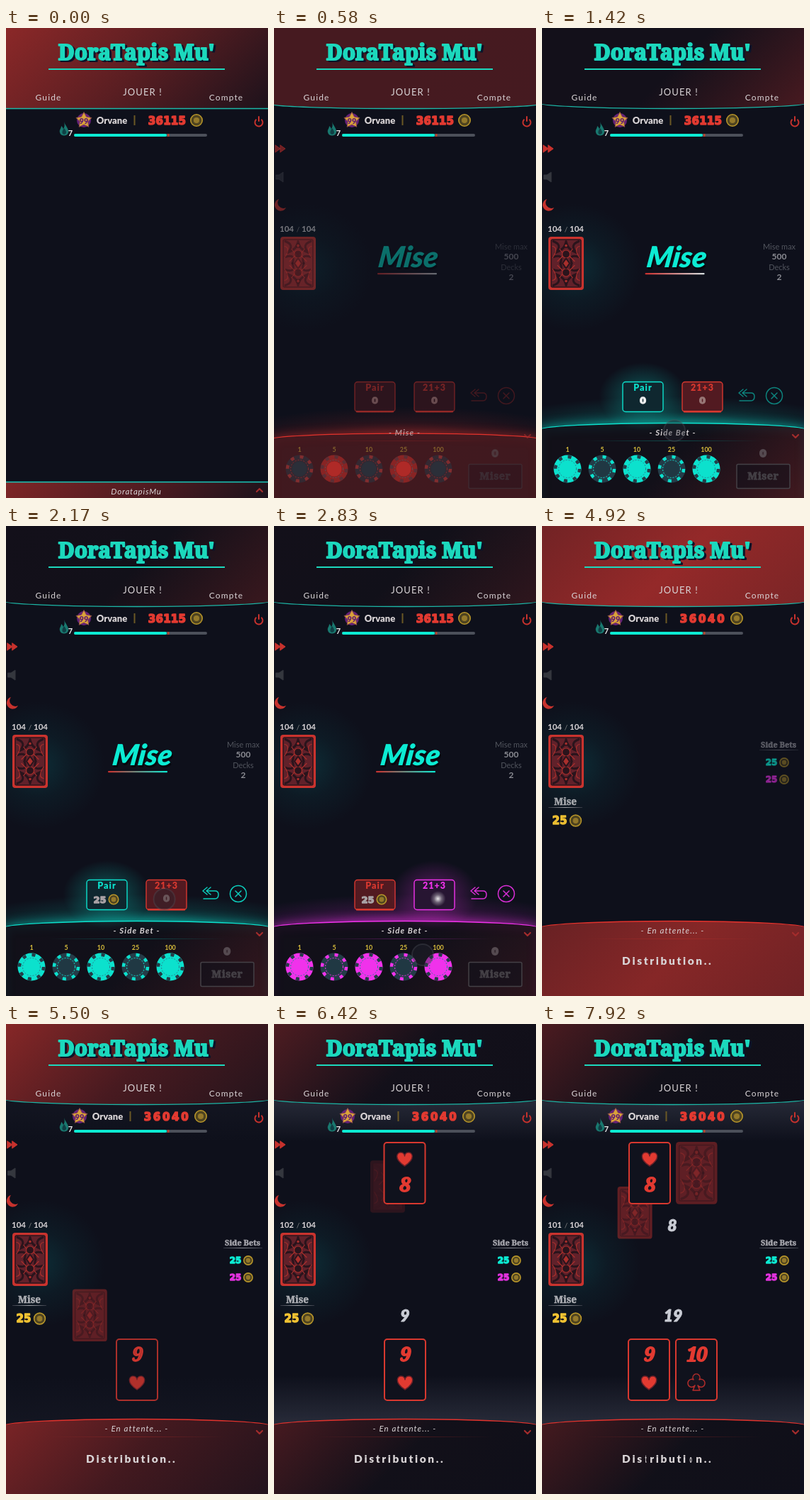
Recreate the animation shown at these times as an HTML page with a canvas. Size 370 by 662 pixels, loop 8 s.

```html
<!DOCTYPE html>
<html lang="fr">
<head>
<meta charset="utf-8">
<title>DoraTapis Mu'</title>
<style>
  html, body { margin: 0; width: 100%; height: 100%; overflow: hidden; background: #0e101b; }
  canvas { display: block; }
</style>
</head>
<body>
<canvas id="stage" width="370" height="662"></canvas>
<script>
const c = document.getElementById('stage').getContext('2d');
const W = 370, H = 662, LOOP = 8000, TAU = Math.PI * 2;
const BG = '#0e101b', CYAN = '#0cebd3', RED = '#e23a31', GOLD = '#b8962a', GREY = '#4c505a', PALE = '#d9d4d6';
const SANS = 'Lato, "Open Sans", sans-serif', SLAB = '"Noto Serif", serif', WIDE = '"DejaVu Sans", sans-serif';

const clamp = v => Math.max(0, Math.min(1, v));
const lerp = (a, b, p) => a + (b - a) * p;
const ramp = (t, from, to) => { const p = clamp((t - from) / (to - from)); return p * p * (3 - 2 * p); };
const rgb = (v, a = 1) => `rgba(${v.map(Math.round).join()},${a})`;

// Interpolates rows of [time, ...values].
function track(t, rows) {
  const i = rows.findIndex(r => r[0] > t);
  if (i === 0) return rows[0].slice(1);
  if (i < 0) return rows[rows.length - 1].slice(1);
  const a = rows[i - 1], b = rows[i], p = ramp(t, a[0], b[0]);
  return a.slice(1).map((v, k) => lerp(v, b[k + 1], p));
}

// Red intensity at the left, middle and right of both panels.
const HEAT = [[0, .82, .5, .1], [750, .3, .35, .4], [1420, .03, .03, .38], [2830, .03, .02, .22],
  [4000, .07, .03, .13], [4350, .3, .2, .3], [4920, .66, .88, .72], [5600, .8, .35, .12], [6420, .42, .03, .01], [7500, .4, .02, .01]];
const ACCENT = [[0, 25, 200, 185], [200, 25, 200, 185], [450, 226, 50, 44], [1080, 226, 50, 44], [1200, 12, 225, 205],
  [2240, 12, 225, 205], [2360, 240, 50, 235], [3060, 240, 50, 235], [3180, 226, 50, 44]];
const POINTER = [[700, 188, 430], [1080, 142, 520], [1150, 142, 520], [1420, 187, 567], [1720, 183, 621], [1880, 183, 621],
  [2220, 226, 520], [2320, 226, 520], [2620, 183, 621], [2720, 183, 621], [2830, 210, 604], [3040, 226, 520],
  [3120, 226, 520], [3440, 183, 621], [3560, 183, 621], [3900, 294, 629], [4080, 294, 629]];

function fade(alpha, draw) {
  if (alpha <= 0) return;
  c.save();
  c.globalAlpha *= Math.min(1, alpha);
  draw();
  c.restore();
}

function text(s, x, y, size, color, { font = SANS, style = '', align = 'center', spacing = 0, stroke = 0 } = {}) {
  c.font = `${style} ${size}px ${font}`;
  c.letterSpacing = spacing + 'px';
  c.textAlign = align;
  c.lineJoin = 'round';
  c.fillStyle = c.strokeStyle = color;
  c.fillText(s, x, y + size * .35);
  if (stroke) { c.lineWidth = stroke; c.strokeText(s, x, y + size * .35); }
}

function circle(x, y, r, fill, stroke, width = 1.5) {
  c.beginPath();
  c.arc(x, y, r, 0, TAU);
  paint(fill, stroke, width);
}

function box(x, y, w, h, r, fill, stroke, width = 1.5) {
  c.beginPath();
  c.roundRect(x, y, w, h, r);
  paint(fill, stroke, width);
}

function shape(d, x, y, fill, stroke, width = 1.5) {
  c.save();
  c.translate(x, y);
  const path = new Path2D(d);
  c.lineJoin = c.lineCap = 'round';
  if (fill) { c.fillStyle = fill; c.fill(path); }
  if (stroke) { c.strokeStyle = stroke; c.lineWidth = width; c.stroke(path); }
  c.restore();
}

function paint(fill, stroke, width) {
  if (fill) { c.fillStyle = fill; c.fill(); }
  if (stroke) { c.strokeStyle = stroke; c.lineWidth = width; c.stroke(); }
}

function gradient(x0, y0, x1, y1, ...colors) {
  const g = c.createLinearGradient(x0, y0, x1, y1);
  colors.forEach((color, i) => g.addColorStop(i / (colors.length - 1), color));
  return g;
}

function glow(x, y, rx, ry, color, alpha) {
  c.save();
  c.translate(x, y);
  c.scale(rx, ry);
  const g = c.createRadialGradient(0, 0, 0, 0, 0, 1);
  g.addColorStop(0, rgb(color, alpha));
  g.addColorStop(.5, rgb(color, alpha * .35));
  g.addColorStop(1, rgb(color, 0));
  c.fillStyle = g;
  c.fillRect(-1, -1, 2, 2);
  c.restore();
}

// Diagonal gradient at 45 degrees across a panel.
function panelFill(t, top, height, strength) {
  const colors = track(t, HEAT).map(h => rgb([14 + 152 * h * strength, 15 + 30 * h * strength, 25 + 18 * h * strength]));
  const d = (W + height) / 4, mid = top + height / 2;
  return gradient(W / 2 - d, mid - d, W / 2 + d, mid + d, ...colors);
}

function coin(x, y, r = 8.5) {
  circle(x, y, r - .8, '#4f4420', GOLD, 1.6);
  circle(x, y, r * .45, '#94792a');
}

function amount(value, x, y, color, size = 14) {
  text(value, x, y, size, color, { font: WIDE, style: 'bold', stroke: 1.3 });
  coin(x + size * 1.5, y, size * .58);
}

function chevron(x, y, dir) {
  shape(`M-4,${2 * dir}L0,${-2 * dir}L4,${2 * dir}`, x, y, null, '#a32c2c', 2.2);
}

function header(t, open) {
  const bend = 8 * open, calm = ramp(t, 5200, 6200);
  c.fillStyle = gradient(0, 100, 0, 165, `rgba(75,80,98,${.45 * calm})`, 'rgba(75,80,98,0)');
  c.fillRect(0, 100, W, 65);
  c.beginPath();
  c.moveTo(-5, -5);
  c.lineTo(-5, 113.5 - bend);
  c.ellipse(185, 113.5 - bend, 190, bend, 0, Math.PI, 0, true);
  c.lineTo(W + 5, -5);
  paint(panelFill(t, 0, 114, 1), '#1cb6a6', 1.3);
  const title = { font: SLAB, style: '900', stroke: 2 };
  text("DoraTapis Mu'", 187, 36, 30, '#0b1429', title);
  text("DoraTapis Mu'", 184, 34, 30, '#1cd8bd', title);
  c.fillStyle = '#1cd8bd';
  c.fillRect(60, 57, 249, 2);
  text('Guide', 60, 98, 12, PALE, { spacing: 1.1 });
  text('JOUER !', 193, 90, 13, PALE, { spacing: 1.1 });
  text('Compte', 311, 98, 12, PALE, { spacing: 1.1 });
}

function star(x, y) {
  circle(x, y, 10, '#642179');
  c.beginPath();
  for (let i = 0; i < 10; i++) {
    const r = i % 2 ? 6 : 11.5, a = i * TAU / 10 - TAU / 4;
    c.lineTo(x + r * Math.cos(a), y + r * Math.sin(a));
  }
  c.closePath();
  paint('#d9a33a', '#8b4a4b', 1);
  text('99', x, y + 1, 11, '#5f1a70', { style: '900' });
}

function statusBar(t) {
  const p = ramp(t, 4200, 4700), shift = 6 * p;
  star(110 - shift, 130);
  text('Orvane', 149.5 - shift, 130, 13, PALE, { style: '900' });
  c.fillStyle = '#6b5825';
  c.fillRect(180.5 - shift, 123, 2, 14);
  text(Math.round(lerp(36115, 36040, p)), 227.5, 130.5, 15, RED, { font: WIDE, style: 'bold', spacing: .3 + 2.4 * p, stroke: 1.6 });
  coin(269 + shift, 130, 9);
  shape('M0,-11C2,-5 7,-1 6,4C5,10-5,10-6,4C-7,0-4,-1-4,-5C-2,-4-2,-2-1,-1C1,-4 1,-7 0,-11Z', 82, 143, '#19786f');
  shape('M0,-2C4,3 4,6 0,7C-4,6-3,2 0,-2Z', 82, 143, '#103f45');
  text('7', 91, 148, 11, '#eee', { style: 'bold' });
  box(96, 149, 188, 4, 2, GREY);
  box(96, 149, 131, 4, 2, CYAN);
  c.fillStyle = '#b34630';
  c.fillRect(228, 149, 2.5, 4);
  c.beginPath();
  c.arc(357, 133, 5.5, -.9, Math.PI + .9);
  paint(null, '#c7322d', 2);
  shape('M0,-7V-1', 357, 132, null, '#c7322d', 2);
}

function cardBack(x, y, scale = 1) {
  c.save();
  c.translate(x, y);
  c.scale(scale, scale);
  const dark = '#2a141c', red = '#a92f2c';
  box(0, 0, 50, 75, 4, '#c9332e');
  box(4, 4, 42, 67, 2, '#61212a', dark, 1.5);
  for (const side of [-1, 1]) {
    c.save();
    c.translate(25, 37.5);
    c.scale(1, side);
    shape('M-18,31Q-4,26-15,15Q-1,20 0,31Q1,20 15,15Q4,26 18,31M-18,9Q-3,14-8,0M18,9Q3,14 8,0', 0, 0, null, dark, 3);
    shape('M-19,24Q-10,22-19,8M19,24Q10,22 19,8M-12,3L-3,12L-9,20M12,3L3,12L9,20', 0, 0, null, red, 1.2);
    circle(0, 13, 5.5, dark, red, 1.2);
    circle(0, 25, 2.5, red, dark);
    c.restore();
  }
  shape('M0,-7L5,0L0,7L-5,0Z', 25, 37.5, red, dark, 2);
  c.restore();
}

function suit(kind, x, y) {
  if (kind === 'heart') shape('M0,10C-17,-1-10,-10-5,-9C-2,-9 0,-6 0,-4C0,-6 2,-9 5,-9C10,-10 17,-1 0,10Z', x, y, RED, '#6b2028', 1.5);
  else shape('M-2,4A5.5,5.5 0 1 1-4,-4A5,5 0 1 1 4,-4A5.5,5.5 0 1 1 2,4L5,11H-5Z', x, y, '#171520', '#b52d2b', 1.5);
}

function cardFace(x, y, rank, kind, flipped) {
  box(x + 1, y + 1, 58, 86, 4, '#10121d', '#d8382f', 2);
  suit(kind, x + 30, y + (flipped ? 24 : 62));
  text(rank, x + 30, y + (flipped ? 61 : 23), 27, RED, { font: SLAB, style: 'italic 900', spacing: -1, stroke: 1.8 });
}

const DEALS = [
  { at: 5280, x: 155, y: 443 }, { at: 6090, x: 155, y: 166 },
  { at: 6900, x: 188, y: 443 }, { at: 7710, x: 189, y: 166 }
];

function table(t) {
  const shown = DEALS.map(d => ramp(t, d.at, d.at + 320));
  const playerX = lerp(155, 121, ramp(t, 6900, 7150)), dealerX = lerp(154.5, 122, ramp(t, 7680, 7850));
  fade(shown[3] * .58, () => cardBack(189, 166, 1.17));
  DEALS.forEach(d => {
    const p = (t - d.at) / 400;
    if (p > 0 && p < 1) fade((1 - p) * .95, () => cardBack(lerp(9, d.x + 19, p * .93), lerp(294, d.y + (d.y < 294 ? 5 : -5), p), .98));
  });
  fade(shown[0], () => cardFace(playerX, 443, '9', 'heart'));
  fade(shown[1], () => cardFace(dealerX, 166, '8', 'heart', true));
  fade(shown[2], () => cardFace(188, 443, '10', 'club'));
  const total = { style: 'italic 900', stroke: .8 };
  fade(ramp(t, 5600, 5800), () => text(t < 7250 ? '9' : '19', 185, 411, 23, '#c9ccd4', total));
  fade(ramp(t, 6500, 6750), () => text('8', 184, 284, 23, '#c9ccd4', total));
}

function deck(t) {
  glow(45, 337, 95, 90, [10, 120, 125], .28);
  const left = 104 - DEALS.filter(d => t > d.at + 250).length;
  text(left, 18, 283, 11.5, PALE, { style: 'bold' });
  text('/', 34, 283, 10, '#888');
  text('104', 49, 283, 11.5, PALE, { style: 'bold' });
  cardBack(9, 294);
}

function sideIcons() {
  shape('M-7,-5L0,0L-7,5ZM0,-5L7,0L0,5Z', 9, 170, '#c7322d', '#c7322d', 1);
  shape('M-5,-3H-1L5,-7V7L-1,3H-5Z', 8, 210, '#34373e', '#34373e', 1);
  shape('M-2,-8A8.5,8.5 0 1 0 8,4A8,8 0 0 1-2,-8Z', 9, 249, '#c7322d');
}

function betBox(t, label, x, active, accent, paidAt) {
  const color = active ? rgb(accent) : '#d8382f', mid = x + 28.5;
  if (active) glow(mid, 519, 62, 48, accent, .5);
  box(x, 498.5, 57, 42, 4, active ? '#10121d' : '#521a21');
  box(x, 498.5, 57, 42, 4, active ? rgb(accent, .1) : null, color, 1.4);
  if (!active) { c.fillStyle = '#d8382f'; c.fillRect(x + 2, 539, 53, 2.5); }
  text(label, mid, 507, 12.5, color, { style: '900', spacing: 1 });
  const paid = ramp(t, paidAt + 130, paidAt + 280);
  fade(1 - ramp(t, paidAt, paidAt + 80), () => text('0', mid, 524, 13, active ? '#eee' : '#977', { font: WIDE, style: 'bold', stroke: 1.4 }));
  glow(mid + 5, 525, 11, 11, [255, 255, 255], .9 * ramp(t, paidAt, paidAt + 80) * (1 - paid));
  fade(paid, () => amount(25, mid - 10, 526, '#aaa3a6', 13));
}

function chip(x, y, accent, bright) {
  const color = rgb(accent), dark = '#243c48';
  circle(x, y, 19.5, bright ? color : dark);
  c.save();
  c.setLineDash([5, 17 * TAU / 8 - 5]);
  circle(x, y, 17, null, bright ? dark : color, 4.5);
  c.setLineDash([2, 2]);
  circle(x, y, 12.5, null, bright ? '#2b8090' : color, 1);
  c.restore();
  circle(x, y, 10.5, bright ? color : '#203843');
}

function betting(t, accent) {
  const visible = ramp(t, 350, 850) * (1 - ramp(t, 4150, 4450));
  const side = t > 1130 && t < 3110, placed = ramp(t, 3500, 3650);
  fade(visible, () => {
    const settle = ramp(t, 1300, 1700);
    const barX = lerp(146, 144, settle);
    const big = { style: 'italic 900' };
    c.save();
    c.translate(lerp(190, 193, settle), 323);
    c.transform(1, 0, -.14, 1, 0, 0);
    text('Mise', 2, 3, 41, '#05070d', big);
    text('Mise', 0, 0, 41, CYAN, big);
    c.restore();
    box(barX, 345, 84, 2.2, 1, gradient(barX, 0, barX + 84, 0, '#c92f2d', t < 1600 ? '#d5dfe0' : CYAN));
    [['Mise max', 308], ['500', 322], ['Decks', 337], ['2', 351]].forEach(([s, y], i) =>
      text(s, 335, y, i % 2 ? 12 : 11, i % 2 ? '#8c8d94' : '#51545d', { style: i % 2 ? 'bold' : '' }));
    betBox(t, 'Pair', 114, side && t < 2290, accent, 1800);
    betBox(t, '21+3', 198, side && t >= 2290, accent, 2730);
    fade(t < 1800 ? .55 : .9, () => {
      const color = rgb(accent);
      shape('M-4,-9L-10,-4L-4,1M1,-9L-5,-4L1,1M-4,-4H7Q12,-4 12,1Q12,7 7,7H-9', 288, 518, null, color);
      circle(328, 518, 11.5, null, color);
      shape('M-4,-4L4,4M4,-4L-4,4', 328, 518, null, color);
    });
    [1, 5, 10, 25, 100].forEach((value, i) => {
      const cx = 36 + 49 * i;
      text(value, cx, 594, 9, '#d9be3c', { style: 'bold' });
      chip(cx, 621, accent, side === (i % 2 === 0));
    });
    fade(1 - placed, () => text('0', 312, 599, 14, '#554a50', { font: WIDE, style: 'bold', stroke: 2 }));
    fade(placed, () => amount(25, 304, 600, PALE, 18));
    const color = rgb(track(placed, [[0, 68, 64, 70], [1, 12, 205, 190]]));
    box(275, 614.5, 75, 34, 2, 'rgba(14,16,27,.5)', color);
    text('Miser', 312.5, 631, 14.5, color, { font: SLAB, style: '900', spacing: .5, stroke: .8 });
  });
}

function wagers(t) {
  const label = { font: SLAB, style: '900', stroke: .5 };
  fade(ramp(t, 4400, 5000), () => {
    text('Mise', 33, 388, 13.5, '#aeb0b5', label);
    box(9, 396, 48, 1, 0, gradient(9, 0, 57, 0, '#333742', '#a4a6ac', '#333742'));
    amount(25, 25, 415, '#f2c332', 15);
  });
  fade(ramp(t, 4550, 5350), () => {
    text('Side Bets', 334, 308, 11, '#a5a5ac', label);
    box(307, 315, 55, 1, 0, gradient(307, 0, 362, 0, '#333742', '#898b93', '#333742'));
    amount(25, 324, 333, CYAN, 12);
    amount(25, 324, 357, '#e332df', 12);
  });
}

function distribution(t) {
  const word = 'Distribution..';
  const style = { style: '900', align: 'left' };
  let x = 113;
  [...word].forEach((letter, i) => {
    c.font = `900 15.5px ${SANS}`;
    c.letterSpacing = '0px';
    const w = c.measureText(letter).width;
    const phase = (((i - 3 - (t - 7920) / 75) % 7) + 10.5) % 7 - 3.5;
    const turn = t > 7500 ? lerp(.35, 1, clamp(Math.abs(phase))) : 1;
    c.save();
    c.translate(x + w / 2, 612.5);
    c.scale(turn, 1);
    text(letter, -w / 2, 0, 15.5, PALE, style);
    c.restore();
    x += w + 2.6;
  });
}

function footer(t, open, accent) {
  const top = lerp(639.5, 556.5, open), bend = 10 * open;
  const calm = ramp(t, 5200, 6200), lit = open * (1 - ramp(t, 4100, 4400));
  c.fillStyle = gradient(0, 495, 0, 560, 'rgba(75,80,98,0)', `rgba(75,80,98,${.4 * calm})`);
  c.fillRect(0, 495, W, 70);
  glow(185, top + 8, 260, 46, accent, .42 * lit);
  c.save();
  c.shadowColor = rgb(accent, .6 * lit);
  c.shadowBlur = 16;
  c.beginPath();
  c.moveTo(-5, H + 5);
  c.lineTo(-5, top + bend);
  c.ellipse(185, top + bend, 190, bend, 0, Math.PI, TAU);
  c.lineTo(W + 5, H + 5);
  paint(panelFill(t, top, H - top, .9), rgb(accent), 1.3);
  c.restore();
  fade(1 - ramp(t, 100, 350), () => {
    text('DoratapisMu', 184, 653, 11.5, PALE, { style: 'italic', spacing: .8 });
    chevron(358, 651, 1);
  });
  fade(ramp(t, 350, 750), () => {
    const caption = t > 4200 ? 'En attente...' : t > 1130 && t < 3110 ? 'Side Bet' : 'Mise';
    text(`- ${caption} -`, 184.5, 570, 11.5, PALE, { style: t > 4200 ? 'italic' : 'italic bold', spacing: 1.1 });
    box(60, 581, 250, 1, 0, gradient(60, 0, 310, 0, rgb(accent, 0), rgb(accent, .3), rgb(accent, 0)));
    chevron(358, 575, -1);
  });
  fade(ramp(t, 4350, 4650), () => distribution(t));
}

function pointer(t) {
  const [x, y] = track(t, POINTER);
  fade(ramp(t, 700, 850) * (1 - ramp(t, 4080, 4250)), () => circle(x, y, 15, 'rgba(35,38,48,.4)', 'rgba(80,83,92,.35)', 2));
}

function render(t) {
  const open = ramp(t, 120, 750), accent = track(t, ACCENT);
  c.fillStyle = BG;
  c.fillRect(0, 0, W, H);
  header(t, open);
  fade(ramp(t, 300, 850), () => { sideIcons(); deck(t); });
  footer(t, open, accent);
  statusBar(t);
  betting(t, accent);
  wagers(t);
  table(t);
  pointer(t);
}

const start = performance.now();
function tick() {
  render((performance.now() - start) % LOOP);
  requestAnimationFrame(tick);
}
tick();
</script>
</body>
</html>
```
